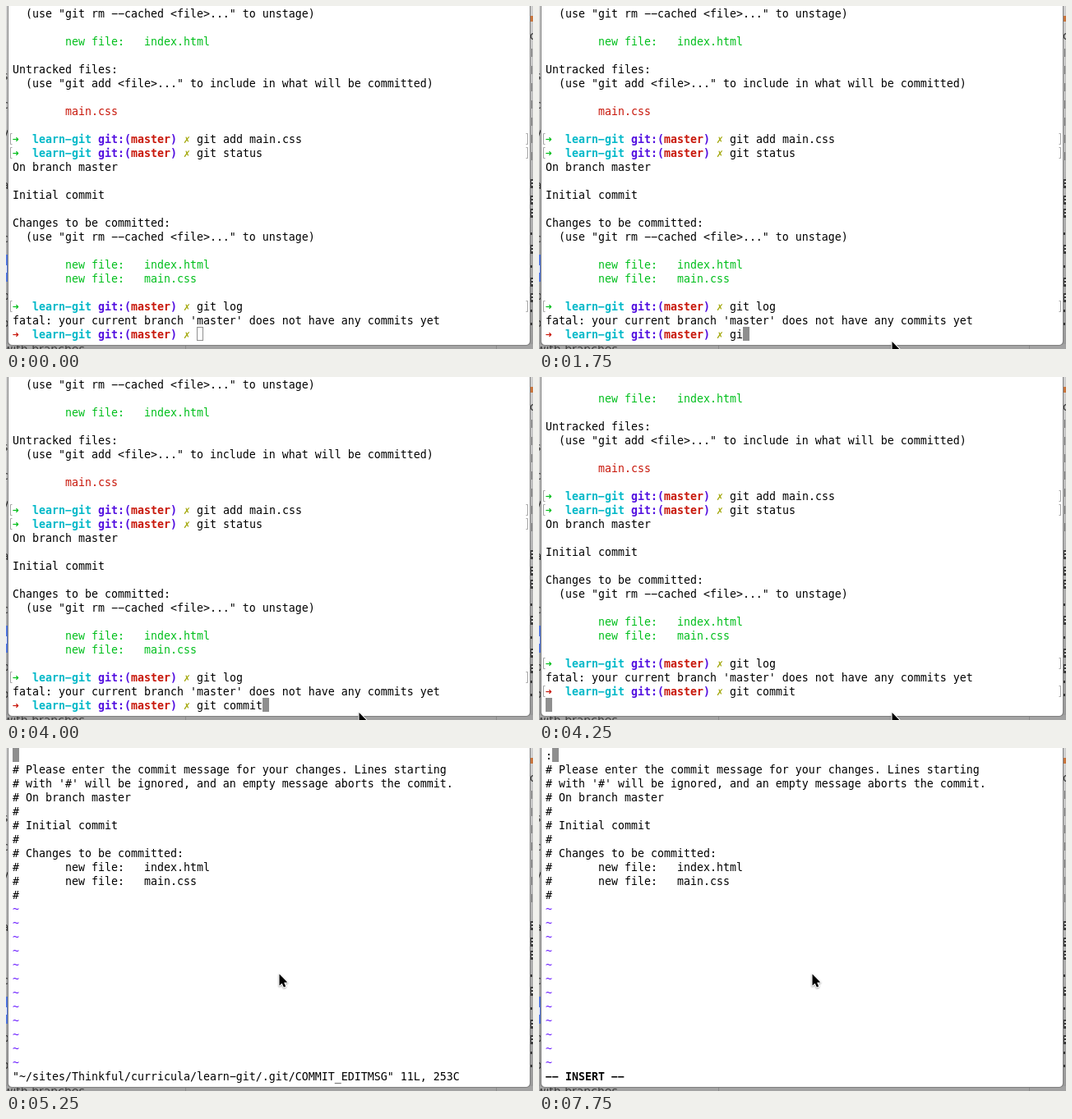
An HTML page with a canvas for the animation above (8000 ms loop, 641 by 418 pixels).

```html
<!DOCTYPE html>
<html lang="en">
<head>
<meta charset="utf-8">
<title>Terminal: git commit</title>
<style>
html, body { margin: 0; width: 100%; height: 100%; overflow: hidden; background: #aaa; }
canvas { display: block; width: 641px; height: 418px; }
</style>
</head>
<body>
<canvas id="stage" width="641" height="418"></canvas>
<script>
const ctx = document.getElementById('stage').getContext('2d');
const W = 641, H = 418, LOOP = 8000;
const CELL = 8, LINE = 17, LEFT = 8, BASE = 14, LAST = 23;
const FONT = '13.29px "DejaVu Sans Mono", "Liberation Mono", monospace';
const BACK_FONT = '14px "DejaVu Sans", "Open Sans", sans-serif';
const C = {
  black: '#000', red: '#c8170a', green: '#00bf1c', yellow: '#a3a80c',
  blue: '#5310e0', cyan: '#00b8c8', tilde: '#6a1cff', cursor: '#8f8f8f', mark: '#a6a6a6'
};

// Each list holds [start time, value...]; the latest started entry applies.
const TYPED = [
  [0, ''], [1750, 'gi'], [2000, 'git '], [2250, 'git oc'], [2750, 'git o'],
  [3000, 'git c'], [3250, 'git com'], [3500, 'git comm'], [3750, 'git commi'], [4000, 'git commit']
];
const POINTER = [
  [250, 565, 162], [500, 438, 291], [750, 414, 331], [1000, 417, 397],
  [1250, 429, 409], [4750, 429, 410], [5000, 322, 297], [5250, 332, 275.5]
];
const FOCUS = 750, ENTER = 4250, EDITOR = 4500, INSERT = 6500, COLON = 7750;
const at = (list, t) => list.filter(e => e[0] <= t).pop();

const HISTORY = [
  [0, '  (use "git rm --cached <file>..." to unstage)'],
  [2, '        new file:   index.html', C.green],
  [4, 'Untracked files:'],
  [5, '  (use "git add <file>..." to include in what will be committed)'],
  [7, '        main.css', C.red],
  [11, 'On branch master'],
  [13, 'Initial commit'],
  [15, 'Changes to be committed:'],
  [16, '  (use "git rm --cached <file>..." to unstage)'],
  [18, '        new file:   index.html', C.green],
  [19, '        new file:   main.css', C.green],
  [22, "fatal: your current branch 'master' does not have any commits yet"]
];
const COMMANDS = [[9, 'git add main.css'], [10, 'git status'], [21, 'git log']];

const MESSAGE = [
  '# Please enter the commit message for your changes. Lines starting',
  "# with '#' will be ignored, and an empty message aborts the commit.",
  '# On branch master',
  '#',
  '# Initial commit',
  '#',
  '# Changes to be committed:',
  '#       new file:   index.html',
  '#       new file:   main.css',
  '#'
];

function rect(x, y, w, h, color) {
  ctx.fillStyle = color;
  ctx.fillRect(x, y, w, h);
}

function text(row, col, str, color = C.black, bold = false) {
  ctx.font = (bold ? 'bold ' : '') + FONT;
  ctx.fillStyle = color;
  // The minus sign gives the wide terminal dash.
  ctx.fillText(str.replace(/-/g, '\u2212'), LEFT + col * CELL, row * LINE + BASE);
}

function cursor(row, col, filled = true) {
  const x = LEFT + col * CELL, y = row * LINE;
  if (filled) return rect(x, y, CELL, LINE, C.cursor);
  ctx.strokeStyle = C.cursor;
  ctx.lineWidth = 1;
  ctx.strokeRect(x + 0.5, y + 0.5, CELL - 1, LINE - 1);
}

function bracket(x, dir, row) {
  const y = row * LINE + 2.5;
  ctx.strokeStyle = C.mark;
  ctx.lineWidth = 1;
  ctx.beginPath();
  ctx.moveTo(x + 2 * dir, y);
  ctx.lineTo(x, y);
  ctx.lineTo(x, y + 13);
  ctx.lineTo(x + 2 * dir, y + 13);
  ctx.stroke();
}

function prompt(row, command, arrow, marked) {
  if (marked) {
    bracket(5.5, 1, row);
    bracket(634.5, -1, row);
  }
  text(row, 0, '➜', arrow, true);
  text(row, 3, 'learn-git', C.cyan, true);
  text(row, 13, 'git:(', C.blue, true);
  text(row, 18, 'master', C.red, true);
  text(row, 24, ')', C.blue, true);
  text(row, 26, '✗', C.yellow, true);
  text(row, 28, command);
}

function backdrop() {
  const shade = ctx.createLinearGradient(0, 0, 0, H);
  shade.addColorStop(0, '#cfcfcf');
  shade.addColorStop(0.4, '#b9b9b9');
  shade.addColorStop(1, '#999');
  rect(0, 0, W, H, shade);

  // Slivers of the page behind the window
  ctx.font = BACK_FONT;
  ctx.fillStyle = '#333';
  for (const [ch, y] of [['s', 90], ['c', 125], ['v', 159], ['a', 223], ['c', 288], ['p', 358], ['o', 391]])
    ctx.fillText(ch, -5, y);
  rect(0, 303, 3, 33, '#4f74dc');
  rect(0, 316, 1, 9, '#e8ecff');
  ctx.fillStyle = '#333';
  ctx.fillText('c', 637, 41);
  rect(638, 12, 3, 7, '#c8743c');
  for (let y = 52; y < 180; y += 21) rect(639, y, 1, 10, '#666');
  for (const y of [211, 231, 247, 291, 331, 350]) {
    rect(638, y, 3, 11, '#3a3a3a');
    rect(639, y + 2, 2, 2, '#ccc');
    rect(639, y + 6, 2, 2, '#ccc');
  }
  for (const y of [276, 316, 370, 386]) rect(638, y, 2, 3, '#333');

  rect(0, 412, W, 6, '#a3a3a3');
  rect(218, 412, 1, 6, '#8a8a8a');
  rect(596, 412, 1, 6, '#8a8a8a');
  ctx.font = BACK_FONT;
  ctx.fillStyle = '#3c3c3c';
  ctx.fillText('with branches', -3, 423);

  ctx.fillStyle = '#808080';
  ctx.beginPath();
  ctx.roundRect(2, -10, 636, 424, 5);
  ctx.fill();
  ctx.fillStyle = '#fff';
  ctx.beginPath();
  ctx.roundRect(3, -10, 634, 423, 4.5);
  ctx.fill();
}

function shell(t) {
  const up = t >= ENTER ? 1 : 0;
  const typed = at(TYPED, t)[1];
  for (const [row, str, color] of HISTORY)
    if (row >= up) text(row - up, 0, str, color);
  for (const [row, command] of COMMANDS) prompt(row - up, command, C.green, true);
  prompt(LAST - up, typed, C.red, up === 1);
  cursor(LAST, up ? 0 : 28 + typed.length, t >= FOCUS);
}

function editor(t) {
  const colon = t >= COLON;
  if (colon) text(0, 0, ':');
  cursor(0, colon ? 1 : 0);
  MESSAGE.forEach((str, i) => text(i + 1, 0, str));
  for (let row = MESSAGE.length + 1; row < LAST; row++) text(row, 0, '~', C.tilde);
  if (t >= INSERT) text(LAST, 0, '-- INSERT --', C.black, true);
  else text(LAST, 0, '"~/sites/Thinkful/curricula/learn-git/.git/COMMIT_EDITMSG" 11L, 253C');
}

const ARROW = [[0, 0], [0, 14], [3.2, 11.2], [5.4, 16], [7.7, 15], [5.6, 10.3], [9.8, 10]];

function pointer(t) {
  const spot = at(POINTER, t);
  if (!spot) return;
  ctx.beginPath();
  for (const [x, y] of ARROW) ctx.lineTo(spot[1] + x + 0.5, spot[2] + y);
  ctx.closePath();
  ctx.lineJoin = 'round';
  ctx.lineWidth = 2;
  ctx.strokeStyle = '#fff';
  ctx.save();
  ctx.shadowColor = 'rgba(0,0,0,.35)';
  ctx.shadowBlur = 2;
  ctx.shadowOffsetY = 1;
  ctx.stroke();
  ctx.restore();
  ctx.fillStyle = '#000';
  ctx.fill();
}

function draw() {
  const t = performance.now() % LOOP;
  backdrop();
  if (t < EDITOR) shell(t);
  else editor(t);
  pointer(t);
  requestAnimationFrame(draw);
}
draw();
</script>
</body>
</html>
```
